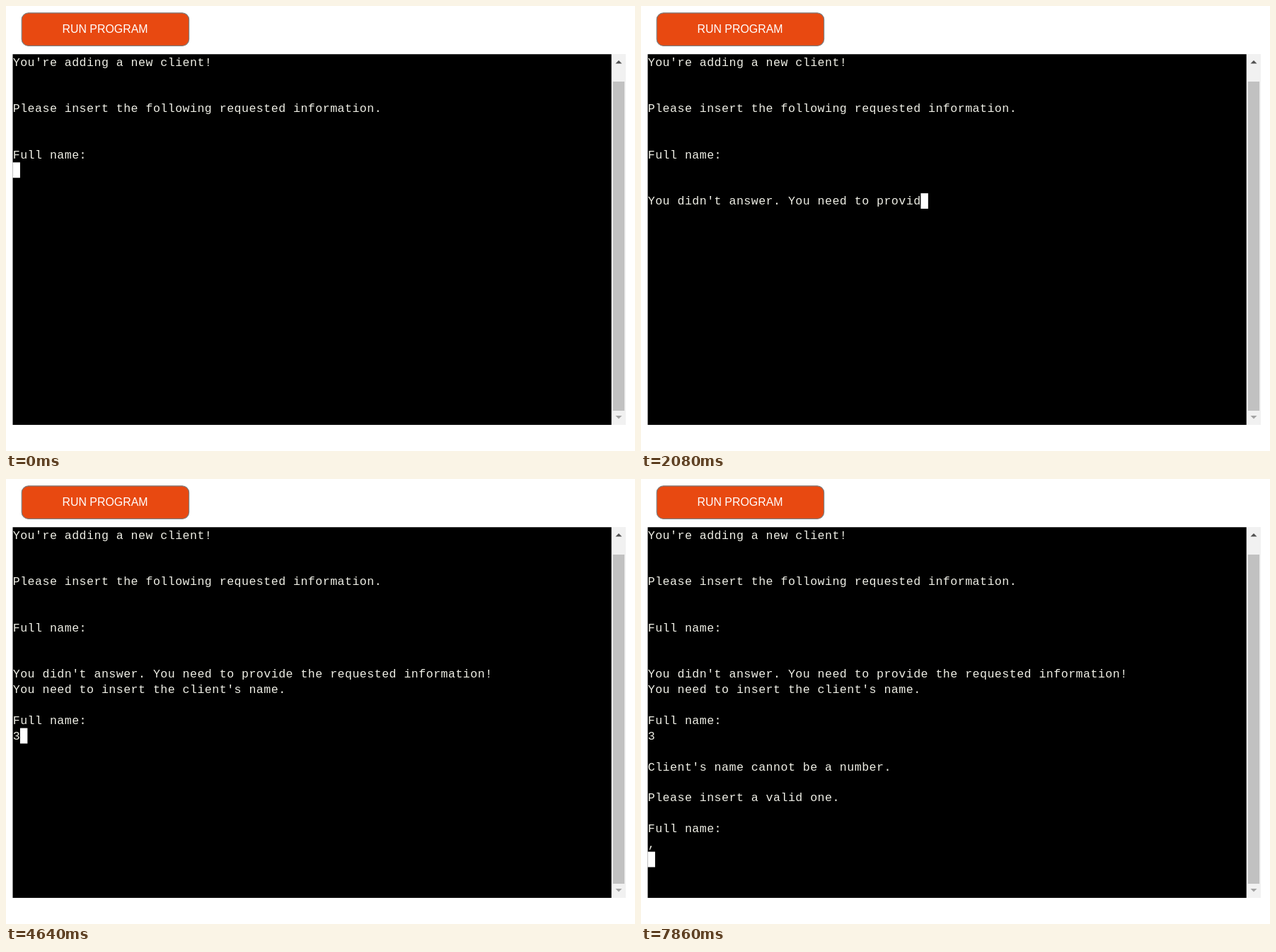
Recreate the animation shown at these times as an HTML page. Size 889 px wide and 630 px high, loop 8000 ms.

```html
<!DOCTYPE html>
<html lang="en">
<head>
<meta charset="utf-8">
<title>Client form terminal</title>
<style>
  html, body { margin: 0; width: 889px; height: 630px; overflow: hidden; background: #fff; }
  body { position: relative; }
  svg, #text { position: absolute; left: 0; top: 0; }
  #label { font: 15.9px Arial, "Liberation Sans", sans-serif; text-anchor: middle; fill: #fff; }
  #text {
    left: 9.75px; top: 69.5px; margin: 0; color: #efefe6; white-space: pre;
    font: 16.6px/21.875px "Courier New", "Liberation Mono", monospace; letter-spacing: .47px;
  }
</style>
</head>
<body>
<svg width="889" height="630">
  <rect x="22.2" y="9.8" width="236.4" height="46.6" rx="9.5" fill="#e84911" stroke="#7d7d7d" stroke-width="1.15"/>
  <text id="label" x="140" y="38.3">RUN PROGRAM</text>
  <rect x="9.5" y="68.25" width="846.2" height="524.75"/>
  <g transform="translate(856 68)">
    <rect width="20" height="525" fill="#f1f1f1"/>
    <rect x="1.8" y="39" width="16.3" height="466" fill="#c1c1c1"/>
    <path d="M5.5 13.5 10 9l4.5 4.5z" fill="#505050"/>
    <path d="M5.5 512 10 516.5l4.5-4.5z" fill="#a3a3a3"/>
  </g>
  <rect id="cursor" width="10.43" height="21.875" fill="#fff"/>
</svg>
<pre id="text"></pre>
<script>
const LOOP = 8000, LEFT = 9.5, TOP = 68.25, CELL_W = 10.43, CELL_H = 21.875;
const text = document.getElementById('text');
const cursor = document.getElementById('cursor');

const ask = 'Full name:\n';
const intro = "You're adding a new client!\n\n\n" +
  'Please insert the following requested information.\n\n\n' + ask;
const missing = "You didn't answer. You need to provide the requested information!";
const retry = intro + '\n\n' + missing + "\nYou need to insert the client's name.\n\n" + ask;
const invalid = retry + "3\n\nClient's name cannot be a number.\n\nPlease insert a valid one.\n\n" + ask;

// The cursor always follows the last character.
const states = [[0, intro], [500, intro + '\n']];

// Screen refreshes while the message prints: [start, refreshes until the next start]
const bursts = [[750, 3], [990, 1], [1080, 6], [1540, 1], [1610, 6], [2080, 1],
  [2150, 3], [2380, 1], [2450, 5], [2850, 1], [2920, 4], [3230, 0]];
bursts.forEach(([start, count], i) => {
  for (let k = 0; k < count; k++) {
    const time = start + Math.round((bursts[i + 1][0] - start) * k / count / 10) * 10;
    const typed = Math.floor(7.9 + (time - 990) / 37.3);
    states.push([time, intro + '\n\n' + missing.slice(0, typed)]);
  }
});

states.push([3230, retry], [4640, retry + '3'], [4890, retry + '3\n'],
  [5140, invalid], [7710, invalid + ','], [7860, invalid + ',\n']);

let shown;
function show(time) {
  const content = states.filter(s => s[0] <= time).pop()[1];
  if (content === shown) return;
  shown = content;
  text.textContent = content;
  const lines = content.split('\n');
  const row = lines.length - 1;
  cursor.setAttribute('x', LEFT + lines[row].length * CELL_W);
  cursor.setAttribute('y', TOP + row * CELL_H);
}

const begin = performance.now();
function tick() {
  show((performance.now() - begin) % LOOP);
  requestAnimationFrame(tick);
}
show(0);
requestAnimationFrame(tick);
</script>
</body>
</html>
```
